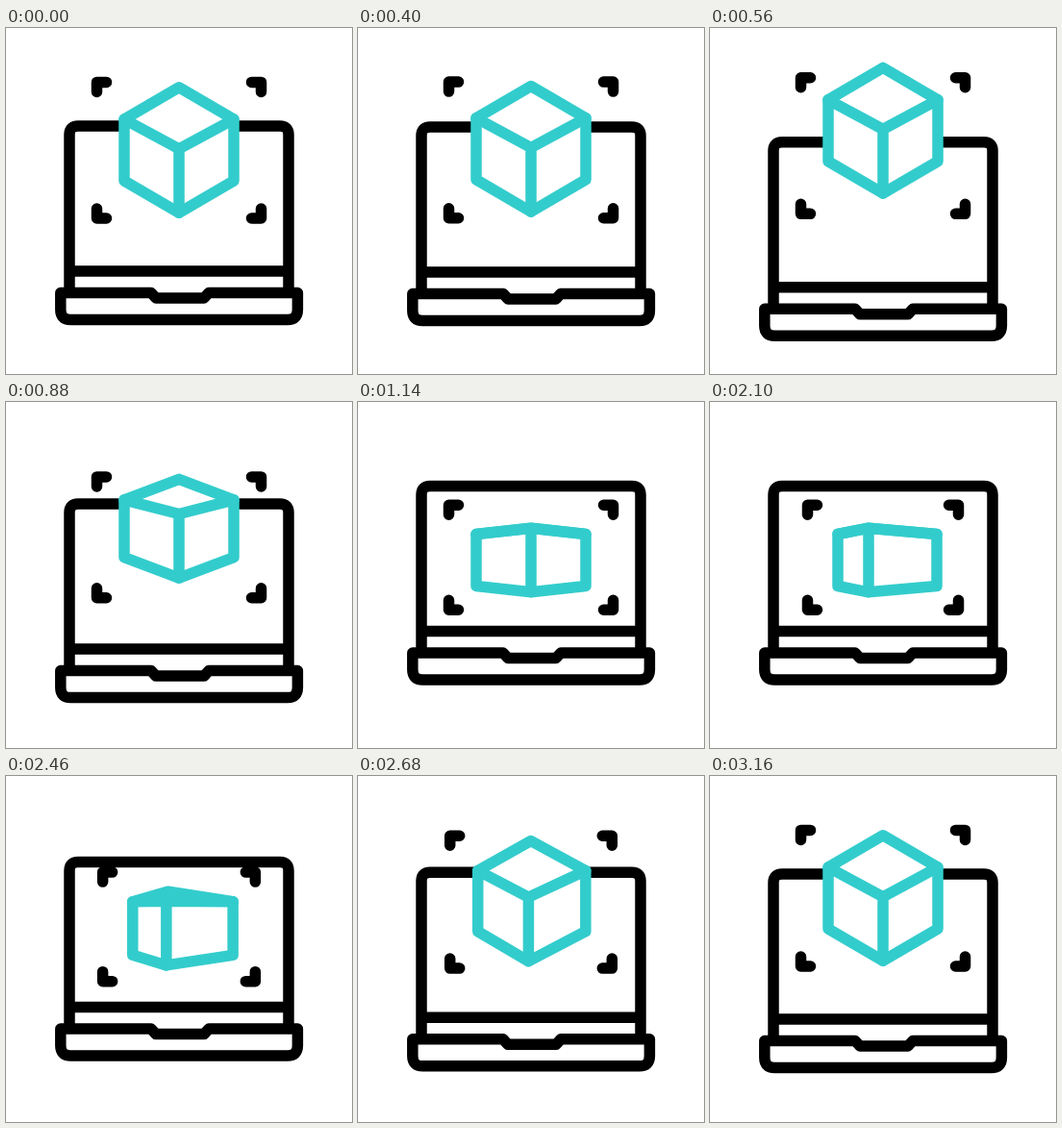
Write an HTML page that moves like this. It is 360 by 360 pixels and loops after 3.3 s.

```html
<!DOCTYPE html>
<html lang="en">
<head>
<meta charset="utf-8">
<title>Laptop with a floating cube</title>
<style>
  html, body { margin: 0; width: 100%; height: 100%; overflow: hidden; background: #fff; }
  svg { display: block; width: 100vw; height: 100vh; }
  path { fill: none; stroke: #000; stroke-width: 11.5; stroke-linecap: round; stroke-linejoin: round; }
  #cube path { stroke: #3cc; }
  #cube #shell { fill: #fff; }
</style>
</head>
<body>
<svg viewBox="0 0 360 360">
  <g id="laptop">
    <path d="M66 275V111q0 -9 9 -9H285q9 0 9 9V275M66 253H294"/>
    <path d="M56.8 275.5H151L156 281H206L211 275.5H303.4V293q0 10.5 -10.5 10.5H67.3q-10.5 0 -10.5 -10.5Z"/>
  </g>
  <g id="cube">
    <path id="shell"/>
    <path id="edges"/>
  </g>
  <path id="marks"/>
</svg>
<script>
const LOOP = 3300, STEP = 20, MID = 180;
const $ = id => document.getElementById(id);
const laptop = $('laptop'), shell = $('shell'), edges = $('edges'), marks = $('marks');

// Eased rise from 0 to 1 between two times
function rise(t, from, to) {
  const u = Math.min(1, Math.max(0, (t - from) / (to - from)));
  return (1 - Math.cos(Math.PI * u)) / 2;
}

const point = (x, y) => `${x.toFixed(2)} ${y.toFixed(2)}`;

// fold: 0 = seen from above, 1 = seen level; turn: -1 = right, 1 = left
function drawCube(fold, turn, lift) {
  const open = 1 - fold;
  const mid = 127 + 37.5 * fold - lift;
  const side = 32 - 5 * fold;
  const left = MID - 57 + (turn > 0 ? 10 : -1) * turn;
  const right = MID + 57 - (turn > 0 ? 1 : -10) * turn;
  const front = MID - 15 * turn, back = MID - 15 * turn * fold;
  const frontTop = mid + 32 * open - 33.3, frontFoot = mid + 32 * open + 33.3;

  const l = point(left, mid - side), r = point(right, mid - side);
  const f = point(front, frontTop), foot = point(front, frontFoot);
  const b = point(back, frontTop - 64 * open);
  shell.setAttribute('d',
    `M${b}L${r}L${point(right, mid + side)}L${foot}L${point(left, mid + side)}L${l}Z`);
  edges.setAttribute('d', `M${l}L${f}L${r}M${f}L${foot}`);
}

function drawMarks(midY, halfW, halfH) {
  let d = '';
  for (const sx of [-1, 1]) {
    for (const sy of [-1, 1]) {
      const x = MID + sx * halfW, y = midY + sy * halfH;
      d += `M${point(x - 10 * sx, y)}L${point(x, y)}L${point(x, y - 10 * sy)}`;
    }
  }
  marks.setAttribute('d', d);
}

function draw(now) {
  const t = Math.floor((now % LOOP) / STEP) * STEP;
  const spread = rise(t, 360, 650);
  const wind = spread - rise(t, 640, 1130);
  const fold = rise(t, 640, 1130) - rise(t, 2360, 2770);
  const turn = 2 * rise(t, 1600, 2080) - rise(t, 1280, 1600) - rise(t, 2360, 2800);
  const hop = rise(t, 2680, 3000) - rise(t, 3000, 3160);
  const lift = 26 * (spread - rise(t, 650, 1080)) + 43 * hop;

  laptop.setAttribute('transform', `translate(0 ${(21.5 * wind - 14.5 * fold).toFixed(2)})`);
  drawCube(fold ** 1.15, turn, lift);
  drawMarks(127.2 - 6 * wind + 34.5 * fold, 85.5 - 7 * Math.abs(turn), 70.8 - 16.3 * fold);
}

function tick() {
  draw(performance.now());
  requestAnimationFrame(tick);
}
tick();
</script>
</body>
</html>
```
